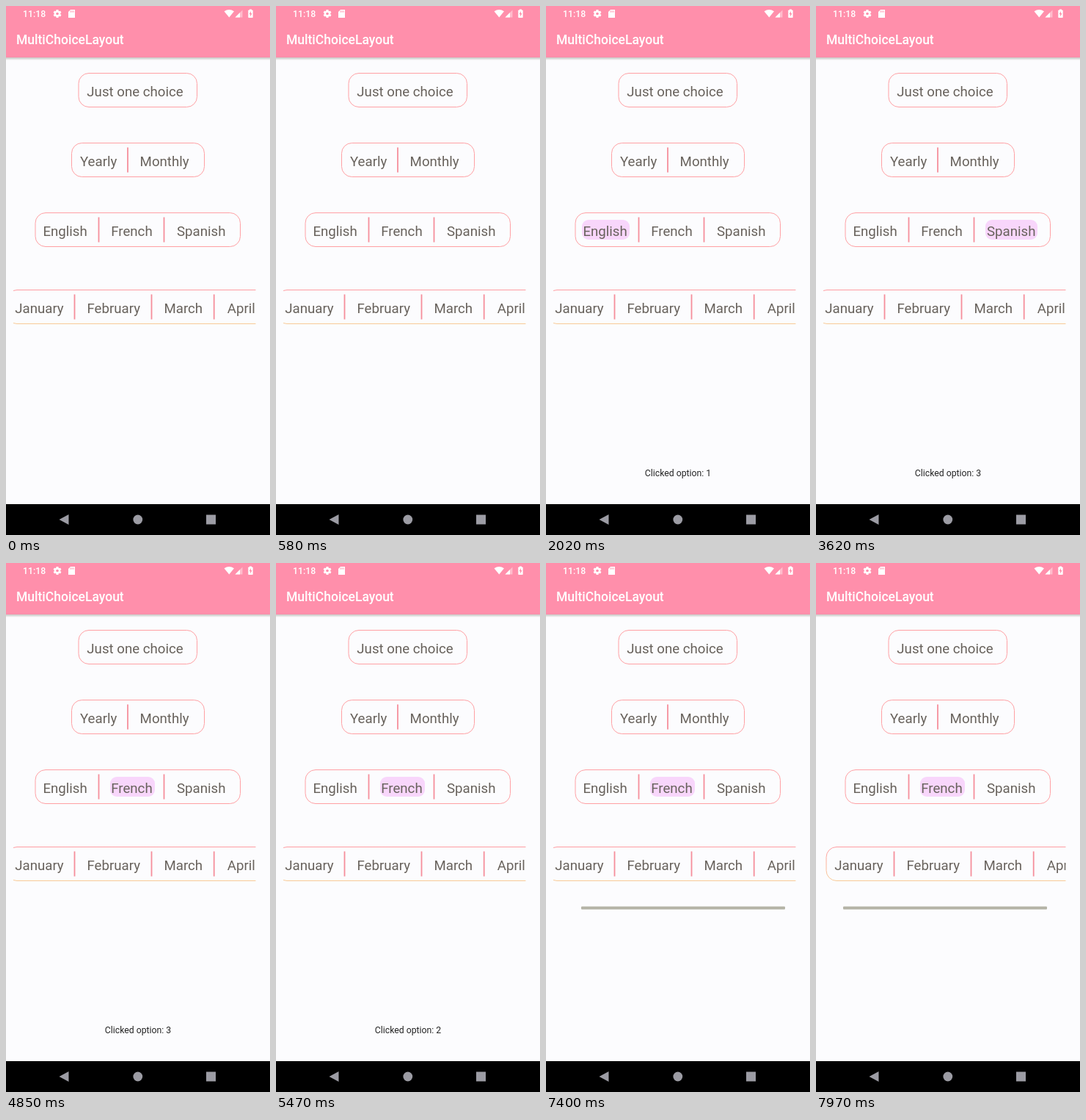
Recreate the animation shown at these times as an HTML page with a canvas. Size 360x720 px, loop 8 s.

```html
<!DOCTYPE html>
<html lang="en">
<head>
<meta charset="utf-8">
<title>MultiChoiceLayout</title>
<style>
  html, body { margin: 0; width: 100%; height: 100%; overflow: hidden; background: #fcfcfe; }
  canvas { display: block; width: 360px; height: 720px; }
</style>
</head>
<body>
<canvas id="stage"></canvas>
<script>
const W = 360, H = 720, LOOP = 8000;
const PINK = '#ff8fab', PAPER = '#fcfcfe', INK = '#68625c', RULE = '#f68f9c';
const canvas = document.getElementById('stage');
const ctx = canvas.getContext('2d');
const dpr = window.devicePixelRatio || 1;
canvas.width = W * dpr;
canvas.height = H * dpr;

const groups = [
  { x: 99, y: 91.5, w: 161.5, labels: [['Just one choice', 110.3]], rules: [] },
  { x: 89.5, y: 186.5, w: 181, labels: [['Yearly', 101], ['Monthly', 182.6]], rules: [166] },
  { x: 40, y: 281.5, w: 279.5,
    labels: [['English', 50.4], ['French', 143.2], ['Spanish', 233]], rules: [126.5, 215.5] }
];
const months = {
  x: 14, y: 386.5, w: 357,
  labels: [['January', 25.2], ['February', 123.5], ['March', 228.5], ['April', 314.8]],
  rules: [106.5, 211.5, 296.7]
};
// Highlighted pill and the time it is tapped
const taps = [
  { at: 1690, x: 49, w: 65 },
  { at: 3050, x: 231, w: 71 },
  { at: 4850, x: 142, w: 61 }
];
const toasts = [
  { n: 1, show: 1690, shown: 2020, hide: 3090 },
  { n: 3, show: 3130, shown: 3620, hide: 4930 },
  { n: 2, show: 4970, shown: 5470, hide: 6900 }
];
const FADE_OUT = 500, BAR_AT = 7360, DRAG_AT = 7890;

const clamp = v => Math.max(0, Math.min(1, v));

function text(str, x, y, size, color, weight = 400) {
  ctx.font = `${weight} ${size}px Roboto, sans-serif`;
  ctx.fillStyle = color;
  ctx.fillText(str, x, y);
}

function box(x, y, w, h, color) {
  ctx.fillStyle = color;
  ctx.fillRect(x, y, w, h);
}

function poly(points, color) {
  ctx.beginPath();
  points.forEach(([x, y]) => ctx.lineTo(x, y));
  ctx.closePath();
  ctx.fillStyle = color;
  ctx.fill();
}

function disc(x, y, r, color) {
  ctx.beginPath();
  ctx.arc(x, y, r, 0, Math.PI * 2);
  ctx.fillStyle = color;
  ctx.fill();
}

function pill(x, y, w, h, r, color) {
  ctx.beginPath();
  ctx.roundRect(x, y, w, h, r);
  ctx.fillStyle = color;
  ctx.fill();
}

function drawGroup(g, stroke) {
  ctx.beginPath();
  ctx.roundRect(g.x, g.y, g.w, 46, 14);
  ctx.lineWidth = 1;
  ctx.strokeStyle = stroke;
  ctx.stroke();
  g.rules.forEach(x => box(x - 0.9, g.y + 6, 1.8, 34, RULE));
  g.labels.forEach(([label, x]) => text(label, x, g.y + 31, 18.67, INK));
}

function drawGear(x, y) {
  ctx.save();
  ctx.translate(x, y);
  for (let i = 0; i < 6; i++) {
    box(-1.5, -5.5, 3, 4, '#fff');
    ctx.rotate(Math.PI / 3);
  }
  ctx.restore();
  disc(x, y, 4.2, '#fff');
  disc(x, y, 1.8, PINK);
}

function drawHeader() {
  box(0, 0, W, 70, PINK);
  const shade = ctx.createLinearGradient(0, 70, 0, 74);
  shade.addColorStop(0, '#c6c4c2');
  shade.addColorStop(1, PAPER);
  box(0, 70, W, 4, shade);

  text('11:18', 23, 15, 12.25, '#fff', 500);
  drawGear(70, 10.5);
  poly([[88, 5], [94, 5], [94, 16], [85, 16], [85, 8]], '#fff');
  [88, 90, 92].forEach(x => box(x - 0.4, 6.3, 0.9, 2.4, PINK));

  ctx.beginPath();
  ctx.moveTo(304.3, 15.5);
  ctx.lineTo(297.5, 7.3);
  ctx.quadraticCurveTo(304.3, 2.7, 311, 7.3);
  ctx.closePath();
  ctx.fillStyle = '#fff';
  ctx.fill();
  poly([[312.5, 15.5], [322.5, 15.5], [322.5, 5.5]], 'rgba(255,255,255,.4)');
  poly([[312.5, 15.5], [319, 15.5], [319, 9]], '#fff');

  box(332, 4.5, 3, 2, '#fff');
  pill(330.3, 5.5, 6.4, 10.5, 0.8, '#fff');
  poly([[334, 7], [331.6, 11.3], [333.1, 11.3], [333.1, 14.4], [335.5, 10.1], [334, 10.1]], PINK);

  text('MultiChoiceLayout', 14, 52.2, 17.5, '#fff', 500);
}

function drawNav() {
  const grey = '#9c9ca4';
  box(0, 678, W, 42, '#000');
  poly([[72.5, 699], [85.5, 692], [85.5, 706]], grey);
  disc(179.8, 699, 6.4, grey);
  box(273, 692.5, 13, 13, grey);
}

function drawMonths(t) {
  const drag = clamp((Math.floor((t - DRAG_AT) / 40) + 1) / 3);
  const stroke = ctx.createLinearGradient(0, 386, 0, 433);
  stroke.addColorStop(0, '#ff9ca2');
  stroke.addColorStop(1, '#f8cb96');
  ctx.save();
  ctx.beginPath();
  ctx.rect(10, 380, 330.5, 60);
  ctx.clip();
  ctx.translate(-13 * (1 - drag), 0);
  drawGroup(months, stroke);
  ctx.restore();
  if (t >= BAR_AT) pill(48 - 11 * drag, 467.5, 278, 4, 1, '#b4b3a6');
}

function drawToasts(t) {
  ctx.textAlign = 'center';
  for (const { n, show, shown, hide } of toasts) {
    const rise = 1 - clamp((t - show) / (shown - show));
    const fall = clamp((t - hide) / FADE_OUT);
    ctx.globalAlpha = (1 - rise * rise) * (1 - fall * fall);
    if (ctx.globalAlpha > 0) text('Clicked option: ' + n, 180, 640.3, 12.25, '#242424');
  }
  ctx.globalAlpha = 1;
  ctx.textAlign = 'left';
}

function draw(t) {
  ctx.setTransform(dpr, 0, 0, dpr, 0, 0);
  box(0, 0, W, H, PAPER);
  drawHeader();
  const picked = taps.filter(tap => t >= tap.at).pop();
  if (picked) pill(picked.x, 291, picked.w, 27, 9, '#f8d6fb');
  groups.forEach(g => drawGroup(g, '#ffa0a4'));
  drawMonths(t);
  drawToasts(t);
  drawNav();
}

const start = performance.now();
function tick() {
  draw((performance.now() - start) % LOOP);
  requestAnimationFrame(tick);
}
tick();
</script>
</body>
</html>
```
